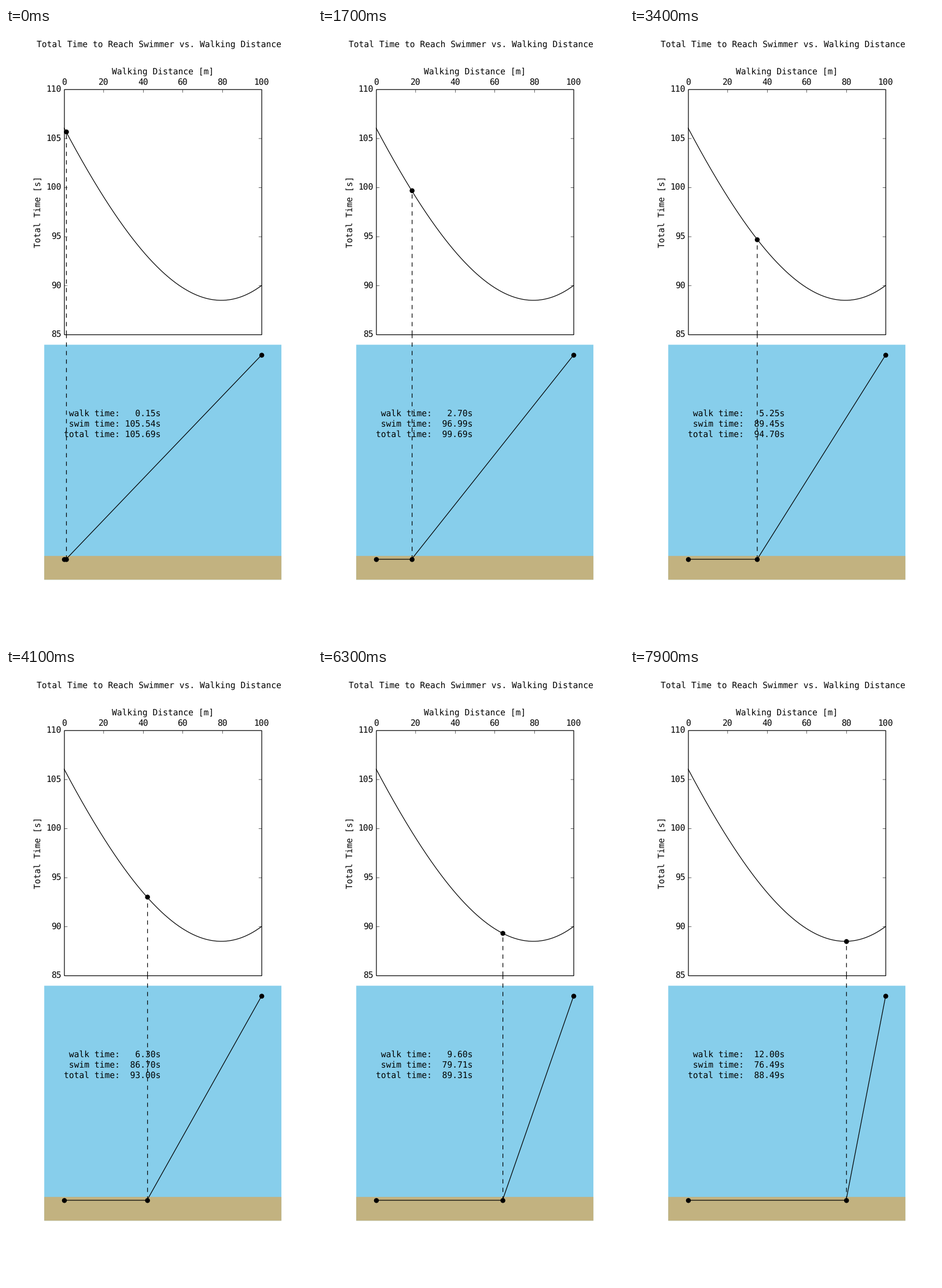
A matplotlib script for the animation above (8 s loop, 529 px wide and 1058 px high).

```python
import numpy as np
import matplotlib.pyplot as plt
from matplotlib.animation import FuncAnimation
from matplotlib.patches import Circle, Rectangle

STAGE_W = 529
FRAMES, INTERVAL = 80, 100
WALK_PACE, SWIM_PACE = 0.15, 0.75  # seconds per metre
SIDE = 100                         # metres along and out from the shore
T_MIN, T_MAX = 85, 110

# Everything is laid out on a 600 x 1200 grid, y down, scaled to the stage.
GRID_W, GRID_H = 600, 1200
X0, X_UNIT = 113.75, 3.875
SHORE, Y_UNIT = 1040, 4
TOP, BASE = 120, 600

plt.rcParams.update({
    "font.family": "DejaVu Sans Mono",
    "font.size": 11.97,
    "text.hinting": "none",
    "lines.linewidth": 1,
    "lines.scale_dashes": False,
    "lines.solid_capstyle": "butt",
})


def walk_time(x):
    return WALK_PACE * x


def swim_time(x):
    return SWIM_PACE * np.hypot(SIDE - x, SIDE)


def total_time(x):
    return walk_time(x) + swim_time(x)


def grid_x(x):
    return X0 + X_UNIT * x


def graph_y(t):
    return BASE - (BASE - TOP) * (t - T_MIN) / (T_MAX - T_MIN)


def snap(v):
    return np.floor(v + 0.5) + 0.5


def line(x, y, **style):
    return stage.plot(x, y, "k-", snap=False, **style)[0]


def dashed():
    return line([], [], dashes=(6, 6), dash_capstyle="butt")


def dot(x, y):
    return stage.add_patch(Circle((snap(x), snap(y)), 4.8, fc="k", lw=0,
                                  zorder=5))


def band(top, bottom, color):
    stage.add_patch(Rectangle((75, top), 465, bottom - top, fc=color, lw=0,
                              snap=False))


fig = plt.figure(figsize=(6, 12), dpi=STAGE_W / 6, facecolor="white")
fig.suptitle("Total Time to Reach Swimmer vs. Walking Distance",
             x=0.5, y=0.98, fontsize=11.97)

# The graph axes carry the labels; all lines are drawn on the stage.
graph = fig.add_axes([X0 / GRID_W, 0.5, X_UNIT * SIDE / GRID_W, 0.4])
graph.set(xlim=(0, SIDE), ylim=(T_MIN, T_MAX))
graph.set_xlabel("Walking Distance [m]", labelpad=5)
graph.set_ylabel("Total Time [s]", labelpad=5)
graph.xaxis.set_label_position("top")
graph.xaxis.tick_top()
graph.tick_params(direction="in", length=4, width=0, pad=4)
graph.spines[:].set_visible(False)
for label in graph.get_yticklabels():
    label.set_va("center")

stage = fig.add_axes([0, 0, 1, 1])
stage.set(xlim=(0, GRID_W), ylim=(GRID_H, 0))
stage.axis("off")

band(620, 1080, "#87ceeb")
band(1033.5, 1080, "#c2b280")

left, right = snap(grid_x(0)), snap(grid_x(SIDE))
top, base = snap(TOP), snap(BASE)
line([left, right, right, left, left], [base, base, top, top, base],
     solid_joinstyle="miter")
for x in range(20, SIDE, 20):
    line([snap(grid_x(x))] * 2, [top, top + 6], lw=0.5)
for t in range(T_MIN + 5, T_MAX, 5):
    y = snap(graph_y(t))
    line([left, left + 6], [y, y], lw=0.5)
    line([right - 6, right], [y, y], lw=0.5)

xs = np.linspace(0, SIDE, 201)
line(grid_x(xs), graph_y(total_time(xs)))

swimmer_y = SHORE - Y_UNIT * SIDE
dot(grid_x(0), SHORE)
dot(grid_x(SIDE), swimmer_y)
turn = dot(grid_x(0), SHORE)
mark = dot(grid_x(0), SHORE)
path = line([], [])
upper, lower = dashed(), dashed()
times = stage.text(X0, SHORE - Y_UNIT * 60, "", linespacing=1.26, zorder=4)


def update(i):
    x = i + 1
    total = total_time(x)
    gx, gy = grid_x(x), graph_y(total)
    path.set_data([grid_x(0), gx, grid_x(SIDE)], [SHORE, SHORE, swimmer_y])
    upper.set_data([snap(gx)] * 2, [base, snap(gy)])
    lower.set_data([snap(gx)] * 2, [snap(SHORE), base])
    turn.center = snap(gx), snap(SHORE)
    mark.center = snap(gx), snap(gy)
    times.set_text(f" walk time: {walk_time(x):6.2f}s\n"
                   f" swim time: {swim_time(x):6.2f}s\n"
                   f"total time: {total:6.2f}s")
    return path, upper, lower, turn, mark, times


anim = FuncAnimation(fig, update, frames=FRAMES, interval=INTERVAL,
                     init_func=lambda: update(0), repeat=True, repeat_delay=0)
plt.show()
```
